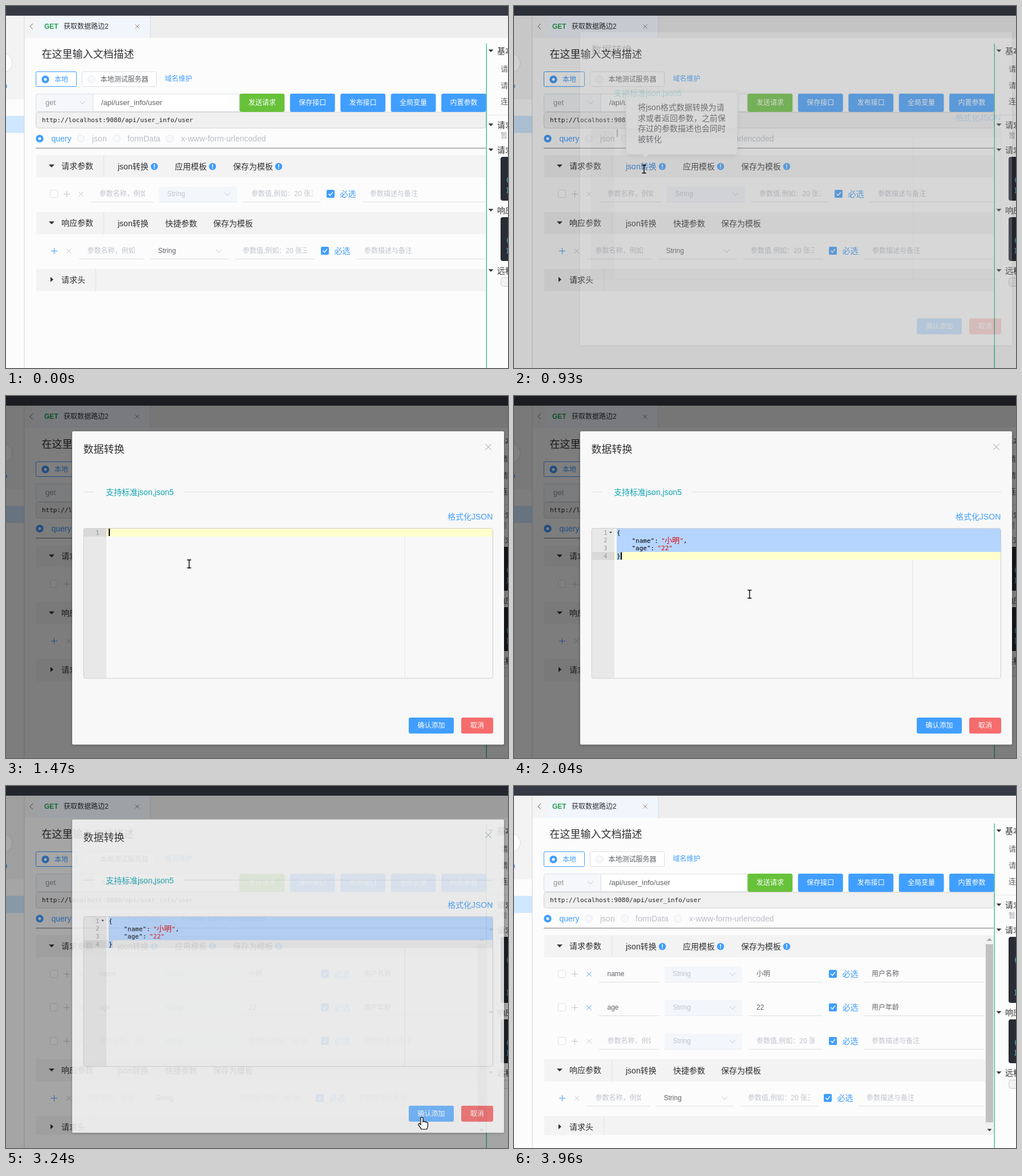
Write an HTML page that moves like this. It is 880x636 px and loops after 5.67 s.

```html
<!DOCTYPE html>
<html lang="zh-CN">
<head>
<meta charset="utf-8">
<title>接口文档</title>
<style>
html, body { margin: 0; width: 100%; height: 100%; overflow: hidden; background: #fcfcfc; }
svg { display: block; }
text { font-family: "Liberation Sans", "Noto Sans CJK SC", "Noto Sans CJK", sans-serif; white-space: pre; }
.mono { font-family: "DejaVu Sans Mono", "Noto Sans CJK SC", monospace; }
#dlg { filter: drop-shadow(0 1px 2px rgba(0,0,0,.3)); }
#tip rect { filter: drop-shadow(0 2px 5px rgba(0,0,0,.1)); }
</style>
</head>
<body>
<svg id="stage" width="880" height="636" viewBox="0 0 880 636"></svg>
<script>
const LOOP = 5670, BLUE = '#409eff', DARK = '#303133', GREY = '#606266', PALE = '#c0c4cc', LINE = '#dcdfe6';

// Drawing helpers; text is placed by its left edge and vertical centre.
const text = (x, cy, s, size = 12, fill = GREY, more = '') =>
  `<text x="${x}" y="${Math.round(cy + size * .37)}" font-size="${size}" fill="${fill}" ${more}>${s}</text>`;
const mono = (x, cy, s, fill = '#000', more = '') => text(x, cy, s, 11, fill, 'class="mono" ' + more);
const rect = (x, y, x2, y2, fill, more = '') =>
  `<rect x="${x}" y="${y}" width="${x2 - x}" height="${y2 - y}" fill="${fill}" ${more}/>`;
const box = (x, y, x2, y2, fill, stroke, r = 2) =>
  rect(x + .5, y + .5, x2 - .5, y2 - .5, fill, `stroke="${stroke}" rx="${r}"`);
const path = (d, stroke, fill = 'none', more = '') => `<path d="${d}" stroke="${stroke}" fill="${fill}" ${more}/>`;
const hline = (x, x2, y, c = LINE) => rect(x, y, x2, y + 1, c);
const clip = (x, x2, cy, s, fill) =>
  `<svg x="${x}" y="${cy - 12}" width="${x2 - x}" height="24">${text(0, 12, s, 12, fill)}</svg>`;
const group = (id, s) => `<g id="${id}">${s}</g>`;

const plus = (x, y, c) => path(`M${x - 5} ${y + .5}h11M${x + .5} ${y - 5}v11`, c);
const cross = (x, y, c, r = 4) => path(`M${x - r} ${y - r}l${2 * r} ${2 * r}m0 ${-2 * r}l${-2 * r} ${2 * r}`, c);
const chevron = (x, y) => path(`M${x - 5} ${y - 2}l5 5 5-5`, PALE);
const down = (x, y, r = 5) => path(`M${x - r} ${y - 2.5}h${2 * r}l${-r} ${r}z`, 'none', DARK);
const radio = (x, y, on) => on
  ? `<circle cx="${x}" cy="${y}" r="6.7" fill="${BLUE}"/><circle cx="${x}" cy="${y}" r="2.5" fill="#fff"/>`
  : `<circle cx="${x}" cy="${y}" r="6.2" fill="#f8f9fb" stroke="#e4e7ed"/>`;
const info = (x, y) =>
  `<circle cx="${x}" cy="${y}" r="6.2" fill="${BLUE}"/>` + rect(x - .8, y - 4, x + .8, y + 1.2, '#fff') + rect(x - .8, y + 2.3, x + .8, y + 3.8, '#fff');
const button = (x, x2, y, y2, s, fill, id = '') =>
  rect(x, y, x2, y2, fill, `rx="3" id="${id}"`) +
  text((x + x2) / 2, (y + y2) / 2, s, 12, '#fff', 'text-anchor="middle" font-weight="500"');

function header(cy, right, split, title, items = [], bottom = cy + 20) {
  const open = items.length;
  return rect(53, cy - 19, right, bottom, '#f3f3f3') + rect(split, cy - 19, split + 1, bottom, '#e2e2e2') +
    (open ? down(80, cy) : path(`M78 ${cy - 5}l5 4.5-5 4.5z`, 'none', DARK)) +
    text(97, cy, title, 14, DARK) + items.map(([x, s]) => text(x, cy + 1, s, 14, DARK)).join('');
}

// One parameter line: xs holds the edges of name, type, value, the tick and the note.
function row(y, xs, request, name, value, note) {
  const [n, n2, s, s2, v, v2, tick, d, d2] = xs;
  const lead = request
    ? box(77, y - 7, 91, y + 7, '#fff', LINE) + plus(106, y, PALE) + cross(131.5, y + .5, name ? BLUE : PALE)
    : plus(84, y, BLUE) + cross(110, y + .5, PALE);
  const type = request ? rect(s, y - 13, s2, y + 14, '#f3f6fb') : '';
  return lead + type + hline(n, n2, y + 14) + hline(s, s2, y + 14, request ? '#e8ebf1' : LINE) +
    hline(v, v2, y + 14) + hline(d, d2, y + 14) +
    clip(n + 14.5, n2 - 15, y, name || '参数名称，例如', name ? GREY : PALE) +
    text(s + 14.5, y, 'String', 12, request ? PALE : GREY) + chevron(s2 - 17, y) +
    clip(v + 14, v2 - 14, y, value || '参数值,例如：20 张三', value ? GREY : PALE) +
    rect(tick, y - 7, tick + 14, y + 7, BLUE, 'rx="2"') +
    path(`M${tick + 3.5} ${y}l2.7 3 4.6-6`, '#fff', 'none', 'stroke-width="1.4"') +
    text(tick + 23.5, y, '必选', 14, BLUE) + text(d + 14, y, note || '参数描述与备注', 12, note ? GREY : PALE);
}

const reqItems = [[196, 'json转换'], [296, '应用模板'], [398, '保存为模板']];
const resItems = [[196, 'json转换'], [279, '快捷参数'], [363, '保存为模板']];
const reqHeader = right => header(281, right, 171, '请求参数', reqItems) + [260, 362, 478].map(x => info(x, 282)).join('');

const code = (y, y2) => rect(867, y, 890, y2, '#282c34', 'rx="4"') +
  mono(876, y + 40, '{', '#61c8e8') + mono(876, y2 - 19, '}', '#61c8e8');
const side = (y, s) => down(850, y, 4.5) + text(861, y, s, 14, DARK);
const sideTail = dy => code(265, 342 + dy) + side(359 + dy, '响应参数') + code(371 + dy, 448 + dy) +
  side(465 + dy, '远程结果') + box(867, 477 + dy, 900, 493 + dy, '#f2f2f2', '#ccc', 4);

const before = reqHeader(840) +
  row(330, [149, 259, 268, 405, 416, 552, 562, 624, 840], true) +
  header(381, 840, 171, '响应参数', resItems) +
  row(430, [128, 241, 252, 390, 401, 541, 552, 614, 840], false) +
  header(481, 840, 157, '请求头') + sideTail(0) +
  group('hot', text(196, 282, 'json转换', 14, BLUE));

const wide = [149, 255, 264, 400, 411, 541, 552, 613, 824];
const after = reqHeader(826) +
  row(330, wide, true, 'name', '小明', '用户名称') +
  row(389, wide, true, 'age', '22', '用户年龄') +
  row(448, wide, true) +
  header(499, 826, 171, '响应参数', resItems) +
  row(548, [128, 238, 248, 386, 396, 533, 543, 604, 824], false) +
  header(599, 826, 157, '请求头', [], 613) + sideTail(39) +
  rect(826, 262, 841, 613, '#f1f1f1') + rect(827, 278, 840, 591, '#c1c1c1') +
  path('M829 272l4.5-4.5 4.5 4.5z', 'none', '#a0a0a0') + down(833.5, 605, 4);

const page = rect(0, 0, 880, 636, '#fcfcfc') +
  rect(0, 17, 32, 164, '#f3f3f3') + rect(0, 193, 32, 223, '#cfe7ff') + rect(31.5, 17, 32.5, 636, '#d4d4d4') +
  '<circle cx="-6" cy="100" r="17" fill="#fff" stroke="#d8d8d8"/>' + rect(0, 138, 1.5, 144, BLUE) +
  rect(33, 17, 880, 56, '#eee') + rect(33, 17, 58, 56, '#f4f4f5') + rect(58, 17, 253, 56, '#f1f6fd') +
  rect(252.5, 17, 253.5, 56, '#d5d9e0') + rect(0, 0, 880, 17, '#363a44') +
  path('M47 31l-5 5 5 5', GREY) + text(67, 36, 'GET', 12, '#28a053', 'font-weight="bold"') +
  text(101, 36, '获取数据路边2', 12, DARK) + cross(230, 36, '#a07f78', 3.5) +
  text(62.5, 84, '在这里输入文档描述', 18, DARK) +
  box(52, 115, 124, 142, '#fff', BLUE) + radio(69, 129, true) + text(85, 129, '本地', 12, BLUE) +
  box(133, 115, 264, 142, '#fff', LINE) + radio(150, 129) + text(165.5, 129, '本地测试服务器', 12, GREY) +
  text(278.5, 128, '域名维护', 12, BLUE) +
  box(52, 154, 153, 186, '#f5f7fa', LINE, 3) + text(69, 169, 'get', 13, '#909399') + chevron(134, 169) +
  box(152, 154, 409, 186, '#fff', LINE, 0) + text(167, 169, '/api/user_info/user', 13) +
  ['发送请求', '保存接口', '发布接口', '全局变量', '内置参数']
    .map((s, i) => button(409.5 + 88.4 * i, 488.3 + 88.4 * i, 154, 186, s, i ? BLUE : '#67c23a')).join('') +
  box(52, 186, 842, 215, '#f0f0f0', '#d3d3d3', 4) + mono(63, 200, 'http://localhost:9080/api/user_info/user', '#222') +
  [59, 131, 194, 287].map((x, i) => radio(x, 233, !i)).join('') + text(79.5, 233, 'query', 14, BLUE) +
  [[151, 'json'], [213, 'formData'], [307, 'x-www-form-urlencoded']].map(([x, s]) => text(x, 233, s, 14, '#b9bdc5')).join('') +
  rect(52, 249, 841, 250.3, '#909090') +
  side(79, '基本信息') + ['请求地址', '请求方式', '连接状态'].map((s, i) => text(867, 110 + 28.7 * i, s, 13)).join('') +
  hline(844, 880, 191, '#e6e6e6') + side(209, '请求参数') + text(867, 228, '暂无数据', 12, '#a0a4ab') + side(253, '请求示例') +
  group('before', before) + group('after', after) + rect(841.5, 66, 843, 636, '#3fc6a0');

const tip = box(196, 151, 392, 261, '#fff', '#ebeef5', 4) + path('M224 260.5l6 6 6-6', '#ebeef5', '#fff') +
  ['将json格式数据转换为请', '求或者返回参数，之前保', '存过的参数描述也会同时', '被转化']
    .map((s, i) => text(217, 178 + 18.6 * i, s, 14)).join('');

const number = (n, y) => mono(163.5, y, n, '#999', 'text-anchor="end"');
const active = y => rect(136.5, y, 176, y + 14, '#d8d8d8') + rect(176, y, 853, y + 14, '#ffffcc', 'class="active"');
const RED = '#df0002';
const blank = active(233) + number(1, 239.5);
const pasted = active(274) + rect(180, 233, 853, 274, '#b5d5ff') + rect(180, 274, 187, 288, '#b5d5ff') +
  [1, 2, 3, 4].map(n => number(n, 225.7 + 13.8 * n)).join('') + path('M167 238.5h5l-2.5 3z', 'none', '#444') +
  mono(180, 239.5, '{') + mono(206.4, 253.5, '"name":') + mono(258, 253.5, '"', RED) +
  text(264.2, 253.5, '小明', 13, RED) + mono(290.5, 253.5, '"', RED) + mono(297, 253.5, ',') +
  mono(206.4, 267, '"age":') + mono(251.5, 267, '"22"', RED) + mono(180, 280.5, '}');

const dialog = rect(116, 62, 873, 612.5, '#f8f8f8', 'rx="2"') +
  text(135.5, 93, '数据转换', 18, DARK) + cross(845.5, 89.5, '#909399', 5) +
  hline(136, 155, 168) + text(175, 169, '支持标准json,json5', 14, '#0fa5b5') + hline(312, 854, 168) +
  text(774, 212, '格式化JSON', 14, BLUE) +
  rect(136, 232.5, 176, 496, '#e8e8e8') + rect(698.5, 233, 699.5, 496, '#e4e4e4') +
  group('blank', blank) + group('pasted', pasted) + rect(0, 0, 2, 13, '#000', 'id="caret"') +
  box(135.5, 232, 854, 496.5, 'none', '#cfcfcf', 4) +
  button(706, 785, 565, 593, '确认添加', BLUE, 'ok') + button(798, 854, 565, 593, '取消', '#f56c6c');

const SHAPES = {
  arrow: path('M0 0V16L4 12.5 6.5 18 9 17 6.5 11.5H12Z', '#000', '#fff'),
  hand: path('M-2 13V2Q-2 0 0 0T2 2V8Q4 6 5.5 8.5 7.5 7 8.5 9.5 10.5 8.5 10.5 11V15Q10.5 18 8.5 21H-1Q-3 17-6 13.5-6.5 10.5-4 11Z', '#000', '#fff', 'stroke-width="1.2"'),
  beam: path('M-3.5-7H3.5M0-7V7M-3.5 7H3.5', '#000', 'none', 'stroke-width="1.4"')
};

stage.innerHTML = page + group('tip', tip) + rect(0, 0, 880, 636, '#000', 'id="shade"') + group('dlg', dialog) +
  group('pointer', Object.keys(SHAPES).map(k => group(k, SHAPES[k])).join(''));

const TRACK = [
  [120, 884, 70], [240, 730, 110], [420, 430, 212], [570, 246, 280], [660, 228, 287], [1140, 228, 286],
  [1230, 299, 290], [1320, 321, 295], [1860, 321, 295], [1950, 332, 301], [2010, 383, 331],
  [2130, 499, 398], [2220, 584, 445], [2280, 638, 475], [2400, 718, 572], [2490, 729, 582],
  [3750, 729, 582], [3960, 892, 440]
];
const $ = id => document.getElementById(id);
const show = (id, on) => $(id).setAttribute('visibility', on ? 'inherit' : 'hidden');
const ramp = (t, start, span) => Math.min(1, Math.max(0, (t - start) / span));

// The CSS "ease" curve.
function ease(p) {
  let lo = 0, hi = 1, u = p;
  for (let i = 0; i < 16; i++) {
    u = (lo + hi) / 2;
    if (.75 * u * (1 - u) + u ** 3 < p) lo = u; else hi = u;
  }
  return p <= 0 ? 0 : p >= 1 ? 1 : .3 * u * (1 - u) ** 2 + 3 * u * u * (1 - u) + u ** 3;
}
const inOut = (t, span) => ease(ramp(t, 885, span)) - ease(ramp(t, 3200, span));

function pointerAt(t) {
  const i = Math.max(1, TRACK.findIndex(k => k[0] >= t));
  const [a, x, y] = TRACK[i - 1], [b, x2, y2] = TRACK[i], p = ramp(t, a, b - a);
  return [x + (x2 - x) * p, y + (y2 - y) * p];
}

function draw(t) {
  const saved = t >= 3200, full = t >= 1860;
  show('before', !saved);
  show('after', saved);
  show('hot', t >= 590 && t < 1000);
  $('tip').setAttribute('opacity', ramp(t, 580, 200) - ramp(t, 1000, 200));

  const d = inOut(t, 300);
  $('shade').setAttribute('opacity', .5 * inOut(t, 200));
  $('dlg').setAttribute('opacity', d);
  $('dlg').setAttribute('transform', `translate(0 ${-20 * (1 - d)})`);
  show('dlg', d > 0);

  show('blank', !full);
  show('pasted', full);
  const focus = t >= 1470 && t < 2970;
  document.querySelectorAll('.active').forEach(e => e.setAttribute('fill', focus ? '#ffffcc' : '#ececec'));
  $('caret').setAttribute('transform', full ? 'translate(187 274.5)' : 'translate(180 233)');
  show('caret', t < 2430 || t >= 2820 && t < 2970);
  $('ok').setAttribute('fill', t < 2400 ? BLUE : t >= 2970 && t < 3030 ? '#3a8ee6' : '#66b1ff');

  const moving = t >= 120 && t < 3960;
  show('pointer', moving);
  if (!moving) return;
  const [x, y] = pointerAt(t);
  $('pointer').setAttribute('transform', `translate(${x} ${y})`);
  const kind = t < 590 ? 'arrow' : t < 900 ? 'hand' : t < 2320 ? 'beam' : t < 2390 || t > 3780 ? 'arrow' : 'hand';
  for (const k in SHAPES) show(k, k === kind);
}

function tick() {
  draw(performance.now() % LOOP);
  requestAnimationFrame(tick);
}
tick();
</script>
</body>
</html>
```
